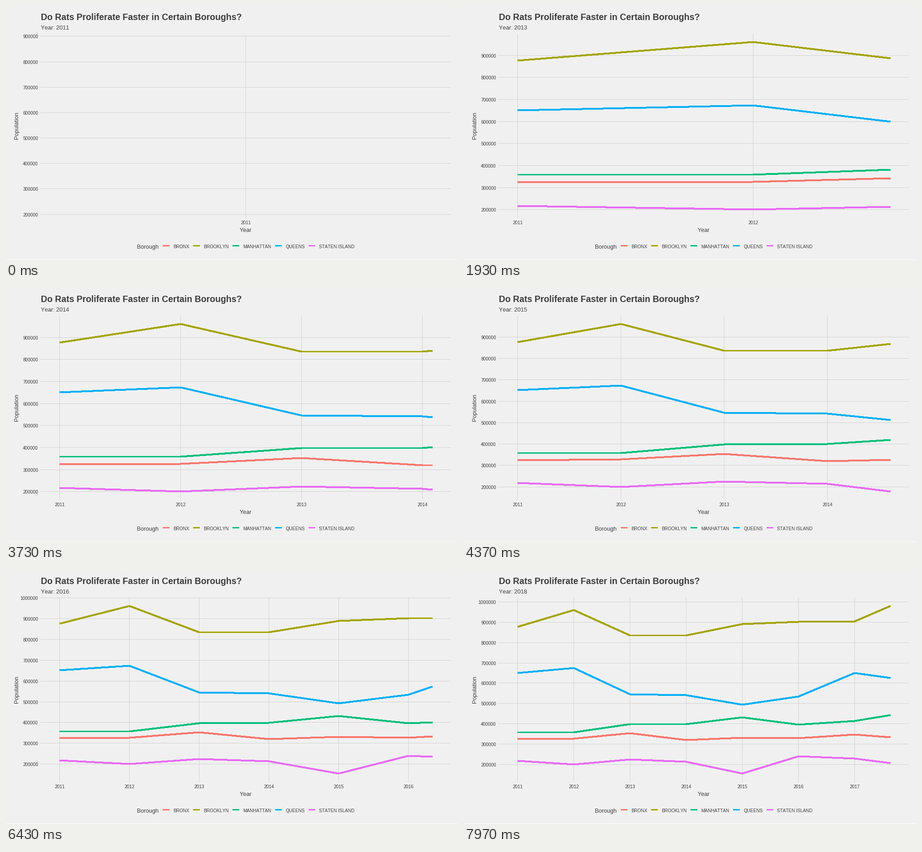
Write a matplotlib script that moves like this. It is 998x561 px and loops after 8 s.

```python
import math

import matplotlib.pyplot as plt
import numpy as np
from matplotlib.animation import FuncAnimation
from matplotlib.patches import Rectangle

W, H, DPI = 998, 561, 64
PT = 72 / DPI  # points per pixel

# The picture changes 30 times a second; ticks of 20 ms keep the timing close
TICK_MS, LOOP_MS, FPS = 20, 8000, 30

BG, GRID, INK = "#f0f0f0", "#d2d2d2", "#3c3c3c"
LEFT, RIGHT, TOP, BOTTOM = 76.7, 982.1, 60.9, 467.9
PAD = 0.05  # share of the data range added on each side
FIRST_YEAR, YEARS = 2011, 8
KEYS = [round(35.91 * k) for k in range(YEARS)]  # step that reaches each year

# Name: colour, yearly population in thousands
SERIES = {
    "BRONX": ("#f8766d", [324, 327, 353, 320, 331, 328, 346, 327]),
    "BROOKLYN": ("#a3a500", [877, 960, 835, 835, 890, 902, 903, 1022]),
    "MANHATTAN": ("#00bf7d", [358, 358, 397, 399, 431, 396, 413, 460]),
    "QUEENS": ("#00b0f6", [651, 674, 545, 541, 493, 534, 650, 611]),
    "STATEN ISLAND": ("#e76bf3", [218, 200, 224, 213, 154, 239, 229, 193]),
}

plt.rcParams["font.family"] = "Liberation Sans"
plt.rcParams["text.kerning_factor"] = 6

fig = plt.figure(figsize=(W / DPI, H / DPI), dpi=DPI, facecolor=BG)
ax = fig.add_axes([0, 0, 1, 1])
ax.set_xlim(0, W)
ax.set_ylim(H, 0)
ax.axis("off")


def label(x, y, text, size, ha="left", **style):
    return ax.text(x, y, text, fontsize=size * PT, color=INK, ha=ha,
                   va="baseline", **style)


def stroke(color, width, xs=(), ys=()):
    line, = ax.plot(xs, ys, color=color, lw=width * PT, antialiased=False,
                    solid_capstyle="butt", solid_joinstyle="round",
                    zorder=width, snap=False)
    return line


def pixel(v):
    """Centre of the nearest whole pixel."""
    return math.floor(v + 0.5) + 0.5


ax.add_patch(Rectangle((0, H - 1), W, 1, color="white", lw=0))
label(77, 31, "Do Rats Proliferate Faster in Certain Boroughs?", 19.5,
      weight="bold")
subtitle = label(77, 52, "", 12.8)
label(529, 499, "Year", 12.8, ha="center")
label(27, 264, "Population", 12.8, ha="center", rotation=90,
      rotation_mode="anchor")

label(289.5, 536, "Borough", 12.8)
lines = []
key_x = 346
for name, (color, _) in SERIES.items():
    stroke(color, 3, [key_x, key_x + 15], [529.5, 529.5])
    text = label(key_x + 23.5, 535, name, 10)
    key_x = round(text.get_window_extent().x1 + 8)
    lines.append(stroke(color, 3))

x_ticks = [(k, stroke(GRID, 1), label(0, 482, FIRST_YEAR + k, 10, "center"))
           for k in range(YEARS)]
y_ticks = [(v, stroke(GRID, 1), label(71, 0, f"{v}000", 10, "right"))
           for v in range(100, 1101, 100)]


def show_tick(line, text, shown):
    line.set_visible(shown)
    text.set_visible(shown)
    return shown


def draw(tick):
    step = int((tick * TICK_MS + 5) * FPS / 1000)
    now = np.interp(step, KEYS, range(YEARS))
    done = [k for k in range(YEARS) if KEYS[k] < step]
    times = done + [now]
    values = [[data[k] for k in done] + [np.interp(step, KEYS, data)]
              for _, data in SERIES.values()]

    low, high = min(map(min, values)), max(map(max, values))
    margin = (high - low) * PAD

    def to_x(t):
        share = (t / now + PAD) / (1 + 2 * PAD) if now else 0.5
        return pixel(LEFT + share * (RIGHT - LEFT))

    def to_y(v):
        share = (high + margin - v) / (high - low + 2 * margin)
        return pixel(TOP + share * (BOTTOM - TOP))

    for k, line, text in x_ticks:
        if show_tick(line, text, k <= now * (1 + PAD) + 1e-9):
            x = to_x(k)
            line.set_data([x, x], [61, 468])
            text.set_x(x)

    for v, line, text in y_ticks:
        if show_tick(line, text, low - margin <= v <= high + margin):
            y = to_y(v)
            line.set_data([76, 982], [y, y])
            text.set_y(y + 4.5)

    for line, vals in zip(lines, values):
        line.set_data([to_x(t) for t in times], [to_y(v) for v in vals])
        line.set_visible(step > 0)

    year = FIRST_YEAR + round((YEARS - 1) * step / KEYS[-1])
    subtitle.set_text(f"Year: {year}")
    return lines


def reset():
    return draw(0)


anim = FuncAnimation(fig, draw, frames=LOOP_MS // TICK_MS, init_func=reset,
                     interval=TICK_MS, repeat=True, repeat_delay=0)
plt.show()
```
